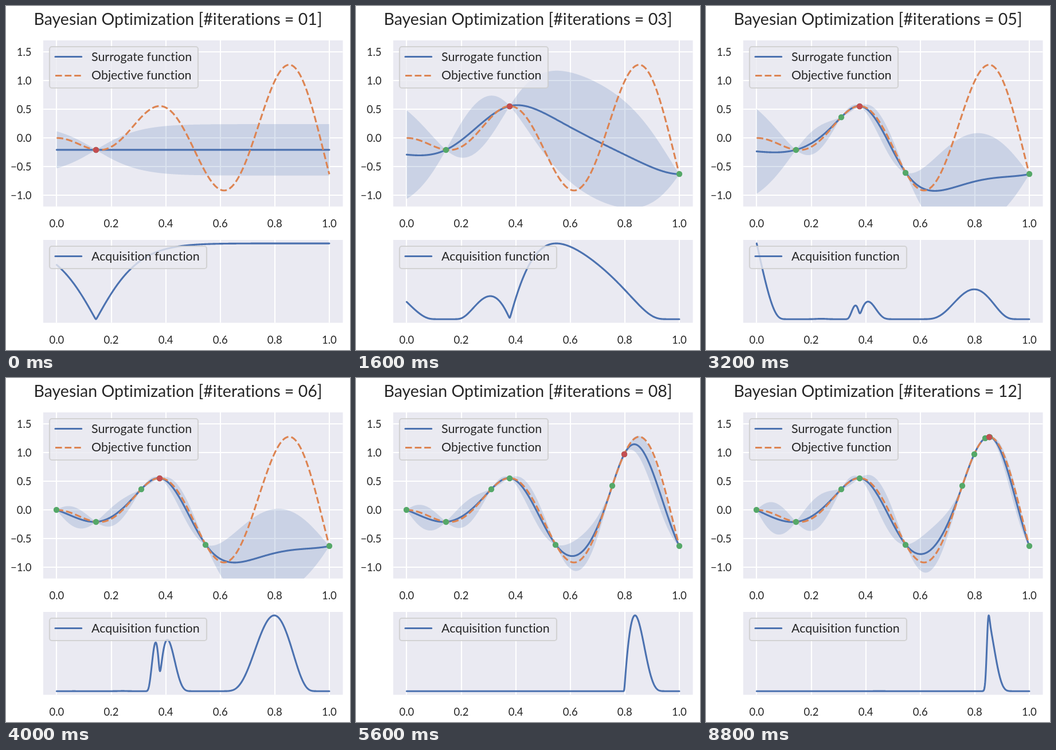
An HTML page with a canvas that plays this animation: 600x600 px, repeating every 9600 ms.

```html
<!DOCTYPE html>
<html lang="en">
<head>
<meta charset="utf-8">
<title>Bayesian Optimization</title>
<style>
html, body { margin: 0; width: 100%; height: 100%; overflow: hidden; background: #fff; }
canvas { display: block; width: 600px; height: 600px; }
</style>
</head>
<body>
<canvas id="stage" width="600" height="600"></canvas>
<script>
const ctx = document.getElementById('stage').getContext('2d');
const STEP = 800;
const BLUE = '#4c72b0', ORANGE = '#dd8452', GREEN = '#55a868', RED = '#c44e52';
const PANEL = '#eaeaf2', INK = '#262626';
const TOP = { x: 65, y: 60, w: 522.5, h: 289.7 };
const LOW = { x: 65, y: 408, w: 522.5, h: 144.5 };
const WIDTH = 3.125, DASH = [3.7 * WIDTH, 1.6 * WIDTH];

// Sampled positions, in the order in which they are tried
const samples = [0.144, 1, 0.378, 0.547, 0.311, 0, 0.798, 0.754, 0.838, 0.8555, 0.8525, 0.8532];
const grid = Array.from({ length: 1001 }, (_, i) => i / 1000);

const objective = x => -1.5 * x * Math.sin(13 * x);
const px = x => 88.4 + 475.5 * x;
const py = y => 230.2 - 100.2 * y;
const mean = a => a.reduce((s, v) => s + v, 0) / a.length;
const dot = (a, b) => a.reduce((s, v, i) => s + v * b[i], 0);

// Matérn 5/2 correlation, length scale 0.2
function corr(a, b) {
  const r = Math.sqrt(5) * Math.abs(a - b) / 0.2;
  return (1 + r + r * r / 3) * Math.exp(-r);
}

function cholesky(K) {
  const L = K.map(row => row.map(() => 0));
  K.forEach((row, i) => {
    for (let j = 0; j <= i; j++) {
      let s = row[j];
      for (let k = 0; k < j; k++) s -= L[i][k] * L[j][k];
      L[i][j] = i === j ? Math.sqrt(s) : s / L[j][j];
    }
  });
  return L;
}

function forward(L, b) {
  const z = [];
  L.forEach((row, i) => {
    let s = b[i];
    for (let k = 0; k < i; k++) s -= row[k] * z[k];
    z[i] = s / row[i];
  });
  return z;
}

function improvement(mu, sd, best) {
  const z = (mu - best) / sd, t = 1 / (1 + 0.2316419 * Math.abs(z));
  const pdf = Math.exp(-z * z / 2) / Math.sqrt(2 * Math.PI);
  const tail = pdf * t * (0.31938153 + t * (-0.356563782 +
    t * (1.781477937 + t * (-1.821255978 + t * 1.330274429))));
  return sd * (pdf + z * (z > 0 ? 1 - tail : tail));
}

// Gaussian process posterior and expected improvement for the first n samples
function fit(n) {
  const xs = samples.slice(0, n), ys = xs.map(objective);
  const m = mean(ys), best = Math.max(...ys);
  const spread = Math.max(0.2, Math.sqrt(mean(ys.map(y => (y - m) ** 2))));
  const variance = 5 * spread ** 2, noise = 1e-4 * variance;
  const L = cholesky(xs.map((a, i) =>
    xs.map((b, j) => variance * corr(a, b) + (i === j ? noise : 0))));
  const zy = forward(L, ys.map(y => y - m));
  const mu = [], sd = [], acq = [];
  for (const x of grid) {
    const zk = forward(L, xs.map(a => variance * corr(a, x)));
    const u = m + dot(zk, zy);
    const s = Math.sqrt(Math.max(1e-10, variance - dot(zk, zk)));
    mu.push(u);
    sd.push(s);
    acq.push(improvement(u, s, best));
  }
  return { xs, ys, mu, sd, acq, top: ys.indexOf(best) };
}

const fits = samples.map((_, i) => fit(i + 1));

function trace(ys, color, dash) {
  ctx.beginPath();
  ys.forEach((y, i) => ctx.lineTo(px(grid[i]), y));
  stroke(color, WIDTH, dash);
}

function stroke(color, width, dash = []) {
  ctx.strokeStyle = color;
  ctx.lineWidth = width;
  ctx.lineJoin = 'round';
  ctx.lineCap = dash.length ? 'butt' : 'round';
  ctx.setLineDash(dash);
  ctx.stroke();
  ctx.setLineDash([]);
}

function line(x1, y1, x2, y2, color, width, dash) {
  ctx.beginPath();
  ctx.moveTo(x1, y1);
  ctx.lineTo(x2, y2);
  stroke(color, width, dash);
}

function text(str, x, y, size, align) {
  ctx.font = size + 'px Lato, sans-serif';
  ctx.letterSpacing = '0.01px'; // any spacing switches ligatures off
  ctx.textAlign = align;
  ctx.fillStyle = INK;
  ctx.fillText(str, x, y);
}

function clip(p) {
  ctx.save();
  ctx.beginPath();
  ctx.rect(p.x, p.y, p.w, p.h);
  ctx.clip();
}

function panel(p, labelY) {
  ctx.fillStyle = PANEL;
  ctx.fillRect(p.x, p.y, p.w, p.h);
  clip(p);
  for (let i = 0; i <= 5; i++) {
    const x = Math.round(px(i / 5));
    line(x, p.y, x, p.y + p.h, '#fff', 2.1);
  }
  ctx.restore();
  for (let i = 0; i <= 5; i++) text((i / 5).toFixed(1), px(i / 5), labelY, 18.5, 'center');
}

function legend(y, w, h, rows) {
  ctx.beginPath();
  ctx.roundRect(76, y, w, h, 4);
  ctx.globalAlpha = 0.8;
  ctx.fillStyle = PANEL;
  ctx.fill();
  stroke('#ccc', 2.1);
  ctx.globalAlpha = 1;
  rows.forEach(([label, color, dash], i) => {
    const ly = y + 17.5 + 33 * i;
    line(86, ly, 131.7, ly, color, WIDTH, dash);
    text(label, 149, y + 25 + 32.3 * i, 21.4, 'left');
  });
}

function draw(n) {
  const f = fits[n];
  ctx.fillStyle = '#fff';
  ctx.fillRect(0, 0, 600, 600);
  text(`Bayesian Optimization [#iterations = ${String(n + 1).padStart(2, '0')}]`, 300, 33, 28.5, 'center');

  panel(TOP, 385.5);
  for (let v = -1; v <= 1.5; v += 0.5) {
    const y = Math.round(py(v));
    line(TOP.x + 1, y, TOP.x + TOP.w - 1, y, '#fff', 2.1);
    text(v.toFixed(1).replace('-', '\u2212'), 44.5, y + 6.7, 18.5, 'right');
  }
  clip(TOP);
  ctx.beginPath();
  grid.forEach((x, i) => ctx.lineTo(px(x), py(f.mu[i] + f.sd[i])));
  for (let i = grid.length - 1; i >= 0; i--) ctx.lineTo(px(grid[i]), py(f.mu[i] - f.sd[i]));
  ctx.fillStyle = 'rgba(76,114,176,0.2)';
  ctx.fill();
  trace(f.mu.map(py), BLUE);
  trace(grid.map(x => py(objective(x))), ORANGE, DASH);
  const mark = (i, color) => {
    ctx.beginPath();
    ctx.arc(Math.round(px(f.xs[i])), Math.round(py(f.ys[i])), 5.2, 0, 2 * Math.PI);
    ctx.fillStyle = color;
    ctx.fill();
  };
  f.xs.forEach((_, i) => mark(i, GREEN));
  mark(f.top, RED);
  ctx.restore();
  legend(71, 259, 72, [['Surrogate function', BLUE], ['Objective function', ORANGE, DASH]]);

  panel(LOW, 588.5);
  const lo = Math.min(...f.acq), hi = Math.max(...f.acq);
  trace(f.acq.map(a => 546.2 - 132.1 * (a - lo) / (hi - lo)), BLUE);
  legend(419, 274, 39, [['Acquisition function', BLUE]]);
}

const start = performance.now();
function tick() {
  draw(Math.floor((performance.now() - start) / STEP) % fits.length);
  requestAnimationFrame(tick);
}
tick();
</script>
</body>
</html>
```
